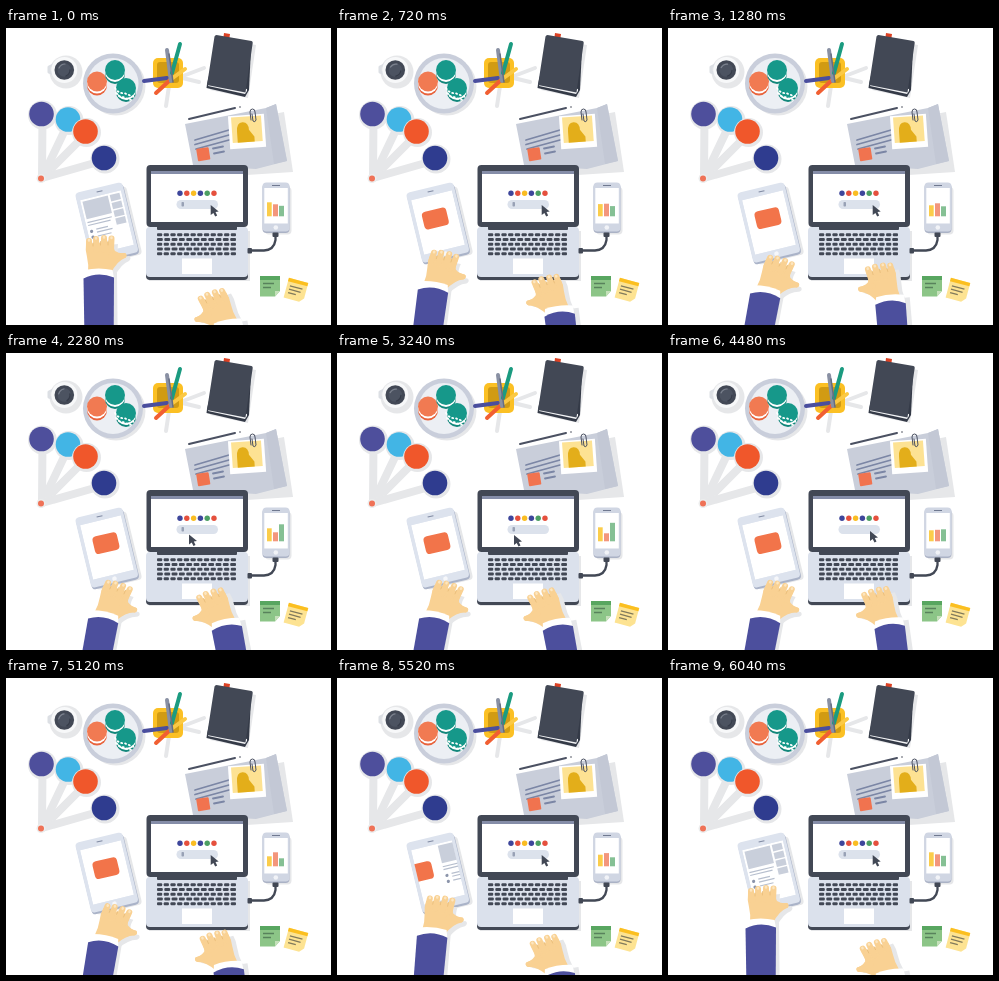
An HTML page for the animation above (6.08 s loop, 325x297 px).

```html
<!DOCTYPE html>
<html lang="en">
<head>
<meta charset="utf-8">
<title>Desk</title>
<style>
html, body { margin: 0; width: 100%; height: 100%; overflow: hidden; background: #fff; }
svg { display: block; width: 325px; height: 297px; }
.soft { fill: #e6e7e9; }
.soft-line { fill: none; stroke: #e6e7e9; stroke-linecap: round; }
.ink { fill: #424855; }
.round { fill: none; stroke-linecap: round; stroke-linejoin: round; }
</style>
</head>
<body>
<svg viewBox="0 0 325 297" xmlns="http://www.w3.org/2000/svg">
<defs>
  <clipPath id="screen"><rect x="-21" y="-28" width="42" height="56"/></clipPath>
  <path id="palm" d="M82 246Q83 237 81 229Q79 222 80 216L108 213Q107 220 109 223Q114 226 119 225Q122 227 119 230Q111 233 105 245Z"/>
  <g id="hand">
    <use href="#palm" fill="#f9d193"/>
    <g class="round" stroke="#f9d193" stroke-width="6">
      <path d="M83 222V213M90.500 222L90 211M98 222V210M105 222L105.500 210.500"/>
      <path d="M105 228L118 227.500" stroke-width="5"/>
    </g>
    <path class="round" d="M87 218V215M94.500 217V213.500M102 217V213" stroke="#e9bd7a" stroke-width=".8"/>
    <path class="round" d="M83 212.500V212M90 210.500V210M98 209.500V209M105.500 210V209.500" stroke="#fce6c1" stroke-width="2.500"/>
  </g>
  <g id="sleeve">
    <path d="M78.500 242Q93 239 106.500 242L108 250H78Z" fill="#fff"/>
    <path d="M77.500 250.500Q92 243 108 249.500L107.500 340H79Z" fill="#4c4f9d"/>
  </g>
  <path id="sleeveShade" class="soft" d="M82 245H111L112 340H82Z"/>
</defs>

<!-- cup -->
<circle class="soft" cx="60" cy="44" r="16.500"/>
<path d="M49 36L43 39V44L49 46" class="round" stroke="#dcdfe4" stroke-width="3"/>
<circle cx="58.300" cy="42" r="13" fill="#f7f8f9"/>
<circle class="ink" cx="58.300" cy="42" r="9.800"/>
<g id="coffee">
  <circle cx="58.300" cy="42" r="6.800" fill="#4c5361"/>
  <path class="round" d="M53 40Q55 36 59 36" stroke="#7c828e" stroke-width="1.200"/>
  <path class="round" d="M60 48Q64 46 64 42" stroke="#363c49" stroke-width="1.300"/>
</g>

<!-- plate -->
<circle class="soft" cx="110" cy="58" r="29.500"/>
<circle cx="107" cy="55.500" r="30" fill="#c9cedb"/>
<circle cx="107" cy="55.500" r="25.500" fill="#eceff4"/>
<g id="sweets"></g>
<path d="M109 60Q113 66 118 65Q123 67 128 69" class="round" stroke="#fff" stroke-width="1.800" stroke-dasharray="1 3"/>
<path d="M110 65Q114 70 118 69Q122 72 126 72" class="round" stroke="#fff" stroke-width="1.800" stroke-dasharray="1 3"/>

<!-- pencil holder -->
<path class="soft-line" d="M164 53L198 40M163 58L160 78M168 48L193 54" stroke-width="4"/>
<rect x="147" y="30" width="30" height="30" rx="5" fill="#fbc024"/>
<rect x="151" y="34" width="22" height="21" rx="3" fill="#d19b13"/>
<g class="round" stroke-width="4">
  <path d="M138 53L161 50" stroke="#4a4e9e"/>
  <path d="M164 52L179 41" stroke="#fbc945"/>
  <path d="M150 65L163 53" stroke="#f15f32"/>
  <path d="M161 22L165 53" stroke="#8990a3"/>
  <path d="M174 16L166 45" stroke="#1b9b80"/>
  <path d="M163 26L167 54" stroke="#656d82" stroke-width="1.500"/>
</g>

<!-- book -->
<path class="soft" d="M215 11L250 17L242 70L204 62Z"/>
<path d="M218 5L224 6L223 13H217Z" fill="#dc4123"/>
<path d="M201 56L200.500 60L239 69L243 62L245 20L212 10Z" fill="#343a47"/>
<path d="M202 58L239 66L241 63V61L203 54Z" fill="#f3f4f6"/>
<path class="ink" d="M210.500 7L245.500 13Q247 13.500 246.700 15L239.500 64.500L201 57L208.500 8.500Q209 7 210.500 7Z"/>

<!-- papers -->
<path class="soft" d="M186 102L278 84L287 144L194 150Z"/>
<path d="M179 96L260 80L270 76L281 133L250 141L187 137Z" fill="#c9ceda"/>
<path d="M260 80L270 76L281 133L268 136Z" fill="#c3c8d5"/>
<path class="round" d="M183 91L229 80" stroke="#4b5162" stroke-width="2"/>
<circle class="ink" cx="234" cy="79" r=".8"/>
<path class="round" d="M189 112L223 102M189 116.500L223 107M190 121L223 112M207 120.500L217 118.500M208 125.500L218 123.500" stroke="#7b86a5" stroke-width="1.800"/>
<rect x="191" y="120" width="12.500" height="12.500" rx="1" fill="#f1734f" transform="rotate(-9 197 126)"/>
<g transform="rotate(-4 241 103)">
  <rect x="223" y="87" width="36" height="33" fill="#fff"/>
  <rect x="226" y="88.500" width="30" height="25.500" fill="#fde293"/>
  <path d="M231 114V103Q231 94 237 94Q243 94 243 102L248 109V114Z" fill="#e3ae1a"/>
</g>
<path class="round" d="M245 92L244 84Q244 81 246.500 81Q249 81 249 84L250 92Q249 95 247 93L246 86" stroke="#4b5162" stroke-width="1"/>

<!-- badges -->
<g id="badges"></g>
<circle cx="35" cy="150.500" r="4.500" fill="#eceded"/>
<circle cx="35" cy="150.500" r="3" fill="#ef7257"/>

<!-- cable and phone -->
<path class="round" d="M269.500 207V212Q268 222 258 222.500H246" stroke="#424855" stroke-width="2.300"/>
<rect class="soft" x="259" y="159" width="26.500" height="47.500" rx="4"/>
<rect x="256.500" y="155.500" width="27" height="49.500" rx="4" fill="#aab2c5"/>
<rect x="256.500" y="154.500" width="27" height="49" rx="4" fill="#d0d6e3"/>
<rect x="258.300" y="160" width="23.500" height="35.500" fill="#fff"/>
<path d="M266 157.500H274" stroke="#707990"/>
<circle cx="269.800" cy="199.500" r="2.300" fill="#f1f3f7"/>
<rect class="ink" x="266.500" y="204.500" width="6" height="4.500" rx="1"/>
<g id="bars">
  <rect x="261" width="4.700" fill="#fbcd4b"/>
  <rect x="267" width="5" fill="#f3967c"/>
  <rect x="273" width="5" fill="#85c094"/>
</g>

<!-- notes -->
<path d="M254 248H274V263L269 268.500H254Z" fill="#8cc587"/>
<path d="M254 248H274V252H254Z" fill="#58a660"/>
<path d="M269 268.500V263H274Z" fill="#c5e0ba"/>
<path d="M257 255.500H268M257 259.500H265" stroke="#58825c" stroke-width="1.300"/>
<g transform="rotate(15 290 262)">
  <path d="M280 252H300V268L296 272.500H280Z" fill="#fde392"/>
  <path d="M280 252H300V255.500H280Z" fill="#fbbf20"/>
  <path d="M283 259.500H296M283 263H295M283 266.500H291" stroke="#807a5c" stroke-width="1.300"/>
</g>

<!-- laptop -->
<path class="soft" d="M143 203H244V253H143Z"/>
<rect class="ink" x="140" y="206" width="102" height="46" rx="4"/>
<rect x="140" y="199" width="102" height="50" rx="4" fill="#dbe1ec"/>
<rect class="ink" x="140.500" y="137" width="101.500" height="62" rx="4"/>
<rect class="ink" x="151" y="198" width="80" height="4" rx="1"/>
<rect class="ink" x="241.500" y="220" width="4.500" height="5.500" rx="1"/>
<rect x="145" y="143" width="92" height="51" fill="#fff"/>
<rect x="145" y="143" width="92" height="3" fill="#858da8"/>
<g id="keys" class="ink"></g>
<rect x="176" y="230.500" width="30" height="15.500" fill="#fff"/>
<g id="dots"></g>
<rect x="170.500" y="172" width="41.500" height="9" rx="4.500" fill="#dce2ec"/>
<rect id="caret" x="175.500" y="174" width="2.500" height="4.500" rx=".8" fill="#98a1b5"/>
<path id="cursor" class="ink" d="M0 0V10L2.700 8L4.500 11.500L6.500 10.500L4.800 7L8 6.500Z"/>

<!-- tablet -->
<g transform="translate(101 194.500) rotate(-13.500)">
  <rect class="soft" x="-20" y="-31" width="47" height="70" rx="4"/>
  <rect x="-24" y="-34" width="48.500" height="72" rx="4" fill="#aab3c8"/>
  <rect x="-24.500" y="-36" width="48.500" height="72" rx="4" fill="#dde3ee"/>
  <path d="M-3 -32H3" stroke="#808aa2"/>
  <circle cy="32" r="2.300" fill="#f6f7fa"/>
  <g clip-path="url(#screen)">
    <rect x="-21" y="-28" width="42" height="56" fill="#fff"/>
    <g id="pages">
      <rect x="-19" y="-26" width="26" height="18" fill="#c9cfdb"/>
      <g id="tiles" fill="#c9cfdb"></g>
      <path d="M-19 -4.500H6M-19 -1.500H4M-12 4H0M-12 7H4M-12 11H2" stroke="#b7bfce" stroke-width="1.200"/>
      <g fill="#8b94aa"><circle cx="-17" cy="5" r="1.600"/><circle cx="-17" cy="11" r="1.600"/></g>
      <rect x="-54.500" y="-13.500" width="25" height="18" rx="4" fill="#f2744a"/>
    </g>
  </g>
</g>

<g id="left">
  <use href="#sleeveShade"/>
  <g class="wrist"><use href="#palm" class="soft" x="4" y="3"/></g>
  <g class="wrist"><use href="#hand"/></g>
  <use href="#sleeve"/>
</g>
<g id="right">
  <use href="#sleeveShade" transform="translate(-9 0)"/>
  <g class="wrist"><use href="#palm" class="soft" x="-4" y="3"/></g>
  <g class="wrist"><use href="#hand"/></g>
  <use href="#sleeve"/>
</g>
</svg>

<script>
const LOOP = 6080;
const $ = id => document.getElementById(id);
const fill = (id, html) => { $(id).innerHTML = html; };
const circle = (x, y, r, color) => `<circle cx="${x}" cy="${y}" r="${r}" fill="${color}"/>`;

fill('sweets', [
  [91, 53.5, '#f17a52', '#e8633c'],
  [109, 42, '#16988a', '#12877b'],
  [120, 60, '#16988a', '#12877b']
].map(([x, y, top, side]) =>
  circle(x, y + 4, 10, side) + circle(x, y + 2, 10, '#fff') + circle(x, y, 10, top)).join(''));

const badges = [[35.5, 86, '#4e4f9c'], [62, 91.5, '#42b5e5'], [79.5, 103.5, '#f0572b'], [98, 130, '#2f3c8f']];
fill('badges',
  badges.map(([x, y]) => `<path class="soft-line" stroke-width="8" d="M36 150L${x + 1} ${y + 2}"/>`).join('') +
  badges.map(([x, y, c]) => circle(x + 1, y + 1, 14.5, '#e6e7e9') + circle(x, y, 12.3, c)).join(''));

fill('dots', ['#3e469b', '#e5503d', '#fabd22', '#3e469b', '#4c9f63', '#e5503d']
  .map((c, i) => circle(174 + i * 6.8, 165.2, 2.7, c)).join(''));

fill('tiles', [-26, -18, -10, -2]
  .map(y => `<rect x="9" y="${y}" width="10" height="6.500"/>`).join(''));

let keys = '';
for (let row = 0; row < 5; row++) {
  const count = row % 2 ? 11 : 12;
  const pitch = 80.5 / count;
  for (let k = 0; k < count; k++)
    keys += `<rect x="${151 + k * pitch}" y="${205.2 + row * 4.75}" width="${pitch - 1.5}" height="3" rx="1"/>`;
}
fill('keys', keys);

// Each row: time, then values; motion eases between rows.
const leftTrack = [[0, 93, 247, 0, 0], [120, 93, 247, 0, 0], [1040, 98, 265, 11, 12],
  [4900, 98, 265, 11, 12], [5120, 98, 263.5, 10, 12], [5960, 93, 247, 0, 0], [LOOP, 93, 247, 0, 0]];
const rightTrack = [[0, 222, 298, -10, 16], [200, 222, 298, -10, 16], [1180, 222, 273, -5, 11],
  [1320, 222, 273, -5, 11], [1920, 220, 272.5, -11, 14], [3500, 220, 272.5, -11, 14],
  [4480, 221, 271.5, -8, 13], [5120, 222, 290, -8, 14], [5920, 222, 298, -10, 16], [LOOP, 222, 298, -10, 16]];
const pageTrack = [[0, 0], [180, 0], [800, 42], [5240, 42], [5880, 0], [LOOP, 0]];
const cursorTrack = [[0, 204.7, 177], [1320, 204.7, 177], [1920, 183, 181.5], [2400, 183, 181.5],
  [2900, 177, 182], [3500, 177, 182], [4480, 202, 178], [4800, 204.7, 177], [LOOP, 204.7, 177]];
const barTrack = [[0, 14, 12, 10.5], [1280, 11, 13, 10], [2280, 13, 9, 17], [3240, 14, 8, 18.5],
  [4480, 11, 11.5, 12], [5120, 10, 14, 8], [6040, 14, 12, 10.5], [LOOP, 14, 12, 10.5]];

const ease = p => (1 - Math.cos(Math.PI * p)) / 2;

function at(track, t) {
  const i = track.findIndex(row => row[0] > t);
  const [a, b] = [track[i - 1], track[i]];
  const p = ease((t - a[0]) / (b[0] - a[0]));
  return a.slice(1).map((v, k) => v + (b[k + 1] - v) * p);
}

function poseArm(id, track, t, flip) {
  const [x, y, arm, wrist] = at(track, t);
  $(id).setAttribute('transform',
    `translate(${x} ${y}) rotate(${arm}) scale(${flip} 1) translate(-93 -247)`);
  for (const part of $(id).querySelectorAll('.wrist'))
    part.setAttribute('transform', `rotate(${wrist} 93 247)`);
}

const bars = [...$('bars').children];

function draw(now) {
  const t = now % LOOP;
  poseArm('left', leftTrack, t, 1);
  poseArm('right', rightTrack, t, -1);
  $('pages').setAttribute('transform', `translate(${at(pageTrack, t)[0]} 0)`);
  $('cursor').setAttribute('transform', `translate(${at(cursorTrack, t).join(' ')})`);
  at(barTrack, t).forEach((h, i) => {
    bars[i].setAttribute('y', 188.3 - h);
    bars[i].setAttribute('height', h);
  });
  $('caret').setAttribute('opacity', t > 4100 && t < 4800 ? 0 : 1);
  $('coffee').setAttribute('transform', `rotate(${10 * Math.sin(t / LOOP * 4 * Math.PI)} 58.3 42)`);
}

const start = performance.now();
function tick() {
  draw(performance.now() - start);
  requestAnimationFrame(tick);
}
tick();
</script>
</body>
</html>
```
